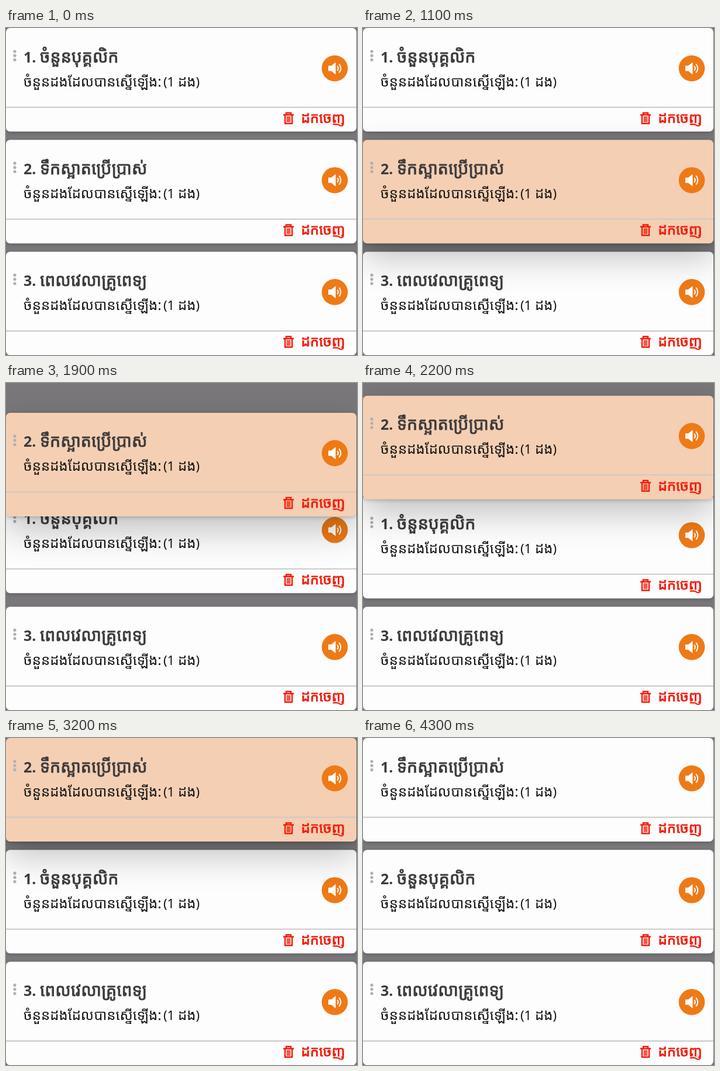
Write an HTML page that moves like this. It is 600x559 px and loops after 4400 ms.

```html
<!DOCTYPE html>
<html lang="km">
<head>
<meta charset="utf-8">
<title>Reorder cards</title>
<style>
  html, body { margin: 0; width: 100%; height: 100%; overflow: hidden; background: #797779; }
  .card {
    position: absolute; left: 0; top: 0; width: 599px; height: 177px;
    border-radius: 7px; overflow: hidden;
  }
  svg { display: block; }
  text { font: 22px "Noto Sans", "Open Sans", sans-serif; fill: #141414; }
  .khmer { font-family: "Noto Sans Khmer", "Noto Sans", sans-serif; font-size: 24px; }
  .number { font-size: 25px; font-weight: 700; fill: #3d3b3d; }
  .title { font-size: 28.5px; fill: #3d3b3d; stroke: #3d3b3d; stroke-width: .9px; }
  .remove { fill: #f61a08; stroke: #f61a08; stroke-width: .8px; }
</style>
</head>
<body>
<script>
const LOOP = 4400, PITCH = 191.2;
const titles = ["ចំនួនបុគ្គលិក", "ទឹកស្អាតប្រើប្រាស់", "ពេលវេលាគ្រូពេទ្យ"];

// Top edge of the dragged card: [time, y]
const dragPath = [[1200, PITCH], [1350, 162], [1600, 89], [1900, 51], [2300, 12], [2600, 10.5], [2950, 0]];

const cardMarkup = title => `
  <svg width="600" height="177">
    <g fill="#b2b0b2">
      <circle cx="15" cy="40" r="2.6"/><circle cx="15" cy="47.2" r="2.6"/><circle cx="15" cy="54.4" r="2.6"/>
    </g>
    <text class="number" x="30" y="58.5"></text>
    <text class="khmer title" x="58" y="58.5">${title}</text>
    <text class="khmer" x="30" y="99.5">ចំនួនដងដែលបានស្នើឡើង:</text>
    <text x="269" y="99.5">(1 <tspan class="khmer">ដង</tspan>)</text>
    <circle cx="562" cy="69" r="22.3" fill="#ee7a17"/>
    <path d="M551 64.5h5l7.5-6v21l-7.5-6h-5z" fill="#fff"/>
    <path d="M566.3 65.2q3 3.8 0 7.6M569.3 61.5q6 7.5 0 15" fill="none" stroke="#fff" stroke-width="2"/>
    <path d="M0 135.5H600" stroke="#cac8c9" stroke-width="2"/>
    <g fill="none" stroke="#f61a08" stroke-width="2.5">
      <path d="M474 148.5h18M479 148v-2.8h8v2.8M477 149v14.2h12V149"/>
      <path d="M480.7 151v10M483 151v10M485.3 151v10" stroke-width="1.6"/>
    </g>
    <text class="khmer remove" x="504.5" y="162">ដកចេញ</text>
  </svg>`;

const cards = titles.map(title => {
  const el = document.createElement("div");
  el.className = "card";
  el.innerHTML = cardMarkup(title);
  document.body.append(el);
  return { el, label: el.querySelector(".number") };
});
cards[1].el.style.zIndex = 1;

const progress = (t, start, end) => Math.min(1, Math.max(0, (t - start) / (end - start)));
const easeOut = p => 1 - (1 - p) ** 3;
const mix = (a, b, p) => a + (b - a) * p;

function follow(path, t) {
  for (let i = 1; i < path.length; i++) {
    const [t0, y0] = path[i - 1], [t1, y1] = path[i];
    if (t < t1) return mix(y0, y1, progress(t, t0, t1));
  }
  return path.at(-1)[1];
}

function paint(card, y, number, lift) {
  const color = [[254, 245], [253, 207], [254, 179]].map(([a, b]) => mix(a, b, lift));
  const style = card.el.style;
  style.transform = `translateY(${y}px)`;
  style.backgroundColor = `rgb(${color})`;
  style.boxShadow = `0 2px 6px rgba(0,0,0,.2), 0 24px 60px rgba(0,0,0,${0.24 * lift})`;
  card.label.textContent = `${number}.`;
}

function frame() {
  const t = performance.now() % LOOP;
  const dropped = t >= 3700;
  const lift = progress(t, 850, 1000) - progress(t, 3550, 3800);
  paint(cards[0], PITCH * easeOut(progress(t, 1680, 2025)), dropped ? 2 : 1, 0);
  paint(cards[1], follow(dragPath, t), dropped ? 1 : 2, lift);
  paint(cards[2], 2 * PITCH, 3, 0);
  requestAnimationFrame(frame);
}
frame();
</script>
</body>
</html>
```
